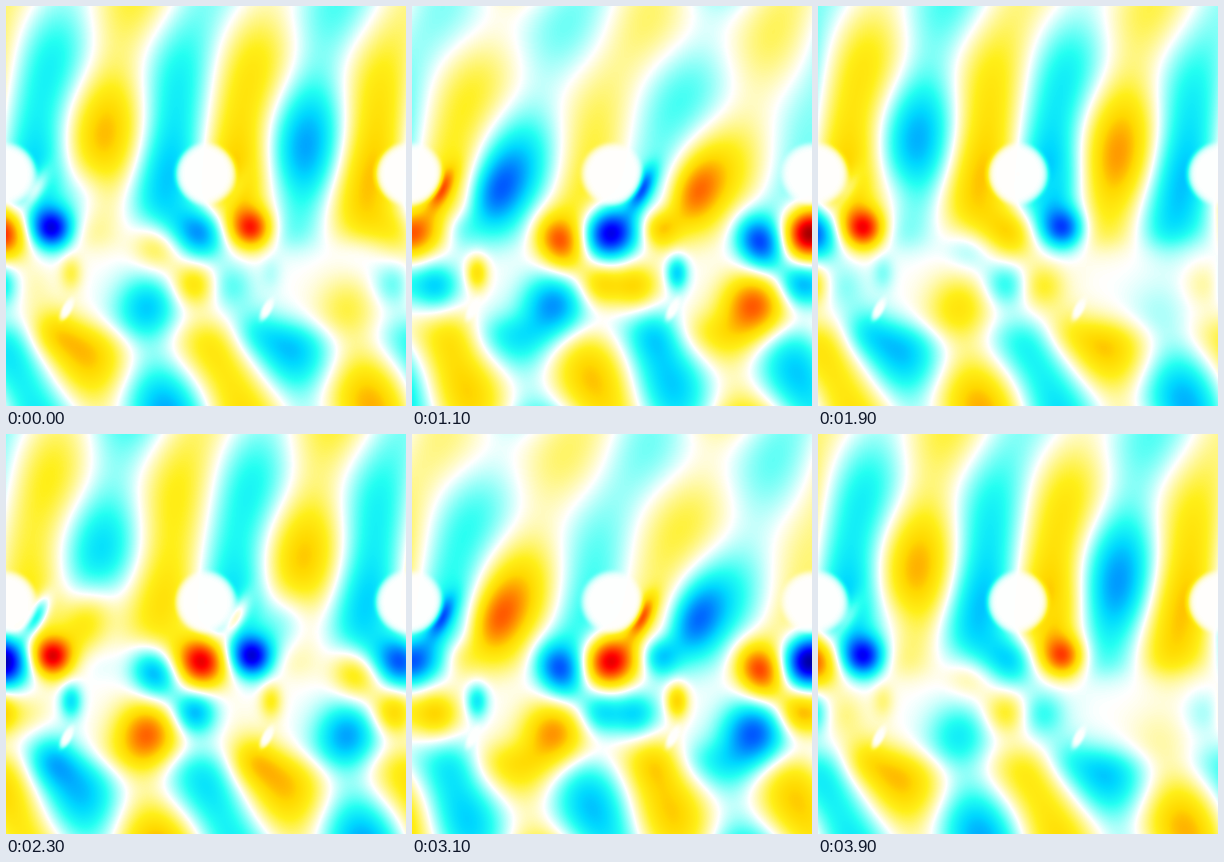
These frames come from a looping animation (400x400 px, 4000 ms). A matplotlib script:

```python
import numpy as np
import matplotlib.pyplot as plt
from matplotlib.animation import FuncAnimation
from matplotlib.colors import LinearSegmentedColormap

SIZE, CELL, FRAMES = 400, 200, 40
LAG = np.radians(18)                 # phase lag from one cell to the next
K1 = np.pi / CELL                    # the two lateral wave numbers
K3 = 3 * K1

gx, gy = np.meshgrid(np.arange(SIZE) + .5, np.arange(SIZE) + .5)


def peak(degrees):
    """Phase factor of a wave that is largest at this time angle."""
    return np.exp(1j * np.radians(degrees))


def step(edge, width):
    return 1 / (1 + np.exp((edge - gy) / width))


def radius2(x, y, r, stretch=1, tilt=0):
    """Squared distance from (x, y) in units of a tilted ellipse."""
    a = np.radians(tilt)
    dx, dy = gx - x, gy - y
    u = np.cos(a) * dx + np.sin(a) * dy
    v = np.cos(a) * dy - np.sin(a) * dx
    return (u / r) ** 2 + (v / (r * stretch)) ** 2


def spot(x, y, r, amp, angle, stretch=1, tilt=0):
    """Pulsing spot, repeated with alternating sign in every cell."""
    shape = sum((-np.exp(1j * LAG)) ** n
                * np.exp(-radius2(x + n * CELL, y, r, stretch, tilt))
                for n in range(-2, 3))
    return amp * peak(angle) * shape


def upper_waves():
    s = gx - 100
    rise = np.exp(-(np.hypot(gy - 160, 30) - 30) / 90)
    standing = -.26 * peak(155) * np.cos(K3 * s) * rise
    leftward = .13 * peak(63) * np.exp(-1j * (K3 * (s - 2) + .014 * (gy - 30)))
    upward = .075 * peak(63) * np.cos(K1 * s) * np.exp(-.044j * (gy - 100))
    return (standing + leftward + upward) * (1 - step(238, 8))


def lower_waves():
    s = gx - 123
    leftward = -.26 * peak(63) * np.exp(-1j * (K3 * s - .014 * (gy - 355)))
    downward = .2 * peak(63) * np.cos(K1 * s) * np.exp(.044j * (gy - 365))
    return (leftward + downward) * step(320, 10)


def resonances():
    return (
        spot(196, 227, 25, -1.05, 60)
        + spot(246, 223, 20, .80, 42)
        + spot(280, 190, 26, .46, 85, stretch=1.6, tilt=25)
        + spot(230, 183, 9, -.50, 75, stretch=2.5, tilt=27)
        + spot(148, 238, 22, .58, 68, stretch=1.3, tilt=-30)
        + spot(142, 299, 31, -.62, 58)
        + spot(188, 279, 22, .46, 50)
        + spot(224, 280, 23, .34, 120)
        + spot(245, 325, 26, -.26, 55)
        + spot(265, 267, 11, -.38, 80, stretch=1.6)
    )


def obstacles():
    mask = np.ones((SIZE, SIZE))
    for x in range(-CELL, SIZE + CELL, CELL):
        mask *= 1 - np.exp(-radius2(x, 168, 30.5) ** 6)
        mask *= 1 - np.exp(-radius2(x + 61, 303, 5, 2.5, 28) ** 2)
    return mask


drift = np.exp(1j * LAG * (gx - 100) / CELL)
wave = ((upper_waves() + lower_waves()) * drift + resonances()) * obstacles()

cmap = LinearSegmentedColormap.from_list("wave", [
    (0, (0, 0, .5)), (.125, (0, 0, 1)), (.33, (0, .85, 1)),
    (.39, (.14, 1, .95)), (.5, (1, 1, 1)), (.61, (1, .94, .1)),
    (.67, (1, .85, 0)), (.875, (1, 0, 0)), (1, (.5, 0, 0))], N=512)

fig = plt.figure(figsize=(4, 4), dpi=100)
ax = fig.add_axes([0, 0, 1, 1])
ax.axis("off")
image = ax.imshow(wave.real, cmap=cmap, vmin=-1, vmax=1,
                  interpolation="nearest", aspect="auto")


def update(frame):
    angle = 2 * np.pi * frame / FRAMES
    image.set_data((wave * np.exp(-1j * angle)).real)
    return [image]


anim = FuncAnimation(fig, update, frames=FRAMES, interval=100,
                     repeat=True, repeat_delay=0)
plt.show()
```
